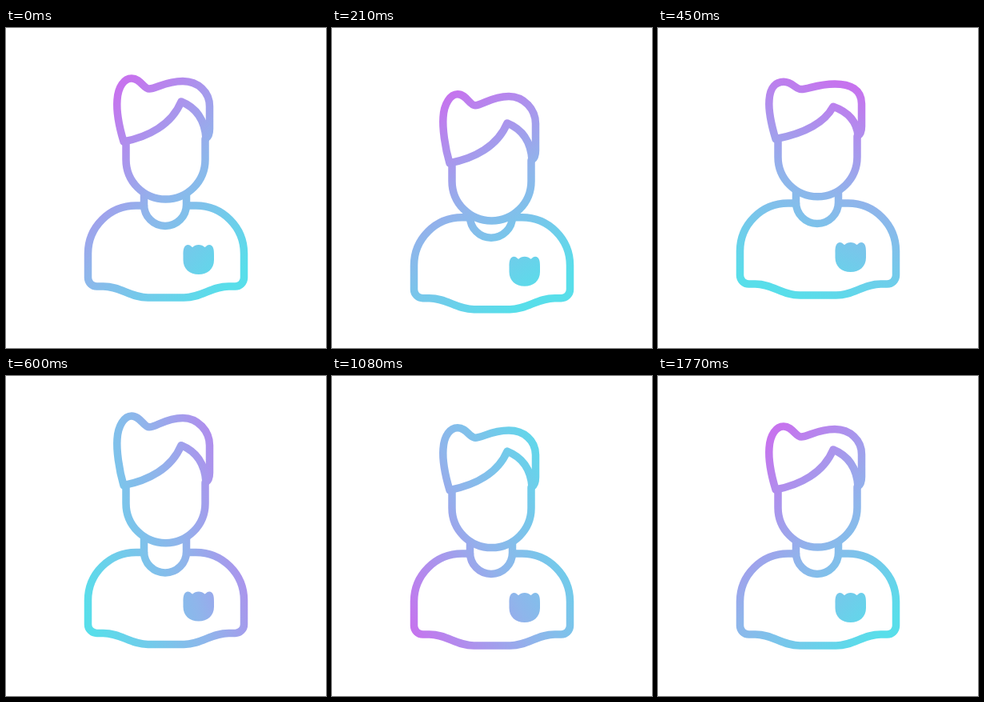
An HTML page that plays this animation: 400x400 px, repeating every 3.8 s.

```html
<!DOCTYPE html>
<html lang="en">
<head>
<meta charset="utf-8">
<title>Avatar</title>
<style>
html, body { margin: 0; width: 100%; height: 100%; overflow: hidden; background: #fff; }
svg { display: block; width: 100%; height: 100%; }
</style>
</head>
<body>
<svg viewBox="0 0 400 400">
  <defs>
    <linearGradient id="tint" gradientUnits="userSpaceOnUse">
      <stop offset="0" stop-color="#c673ee"/>
      <stop offset="0.5" stop-color="#8fb5eb"/>
      <stop offset="1" stop-color="#58deea"/>
    </linearGradient>
  </defs>
  <g fill="none" stroke="url(#tint)" stroke-width="9.5" stroke-linecap="round" stroke-linejoin="round">
    <path id="torso"/>
    <path id="neck"/>
    <path id="face"/>
    <path id="hair"/>
  </g>
  <path id="badge" fill="url(#tint)"/>
</svg>
<script>
const LOOP = 3800, ACTIVE = 1770;
const $ = id => document.getElementById(id);
const draw = (id, d) => $(id).setAttribute('d', d);

// Swings from 0 through evenly spaced peaks and back to 0
function swing(t, first, half, peaks) {
  const keys = [0, ...peaks, 0];
  const pos = t < first ? t / first : 1 + (t - first) / half;
  const i = Math.floor(pos);
  if (i >= keys.length - 1) return 0;
  const mix = (1 - Math.cos(Math.PI * (pos - i))) / 2;
  return keys[i] + (keys[i + 1] - keys[i]) * mix;
}

// cubic-bezier(.4, 0, .4, 1)
function ease(x) {
  let lo = 0, hi = 1;
  for (let i = 0; i < 24; i++) {
    const s = (lo + hi) / 2;
    if (1.2 * (1 - s) * s + s * s * s < x) lo = s; else hi = s;
  }
  return lo * lo * (3 - 2 * lo);
}

// The gradient turns once around the figure
function spin(t) {
  const angle = (225 + 360 * ease(Math.min(t / ACTIVE, 1))) * Math.PI / 180;
  const point = (n, r) => {
    $('tint').setAttribute('x' + n, 207 + r * Math.cos(angle));
    $('tint').setAttribute('y' + n, 214 + r * Math.sin(angle));
  };
  point(1, 144);
  point(2, -126);
}

// bend: -1 flattened, 1 stretched
function drawHair(dy, bend) {
  const at = (y, flat, tall) => y + dy + (bend < 0 ? -bend * flat : -bend * tall);
  const root = 142 + dy, end = 138 + dy;
  const side = at(90, 7, 6), tuft = at(63, 16, 8), notch = at(76, 8, 7);
  const crown = at(66.5, 14, 9), corner = at(98, 0, 6), tip = at(92, 20, 0);
  draw('hair', `M147 ${root}C141 ${root - 20} 138 ${side + 13} 139 ${side}
    C140 ${side - 17} 148 ${tuft} 157 ${tuft}
    C168 ${tuft} 172 ${notch} 179 ${notch}
    C188 ${notch} 199 ${crown} 221 ${crown}
    C240 ${crown} 254.5 ${corner - 18} 254.5 ${corner}
    V${end - 12}q0 9 -4.5 12
    C248.500 ${at(115, 10, 0)} 237.500 ${at(99.500, 18, 0)} 219 ${tip}
    C207 ${at(121, 6, 0)} 178 ${root - 6} 147 ${root}Z`);
}

function drawBody(dy) {
  draw('torso', `M172.5 ${222 + dy}h-10a60 60 0 0 0 -60 60v30a11 11 0 0 0 11 11h8
    c22 0 34 14 56 14h45c22 0 34 -14 56 -14h8a11 11 0 0 0 11 -11v-30a60 60 0 0 0 -60 -60h-10`);
  draw('badge', `M221.5 ${284 + dy}c-.3 -8 1.5 -13 6 -13c3.5 0 4 3 5.8 3c3.5 -4 11.5 -4 15 0
    c1.8 0 2.3 -3 5.8 -3c4.5 0 6.2 5 5.9 13v6c0 11 -8 18 -19.25 18s-19.25 -7 -19.25 -18Z`);
}

function render(t) {
  const body = swing(t, 200, 270, [14.8, -3.2, 0.2]);
  const head = swing(t, 200, 320, [27, -7, 4]);
  const bend = swing(t, 180, 200, [1, -1.05, 1, -0.15, -0.15]);
  spin(t);
  drawBody(body);
  draw('neck', `M172.5 ${208 + head}V${221 + body}a26.5 26.5 0 0 0 53 0V${208 + head}`);
  draw('face', `M150 ${143 + head}v21.5a49.5 49.5 0 0 0 99 0v-26`);
  drawHair(head, bend);
}

function tick() {
  render(performance.now() % LOOP);
  requestAnimationFrame(tick);
}
tick();
</script>
</body>
</html>
```
